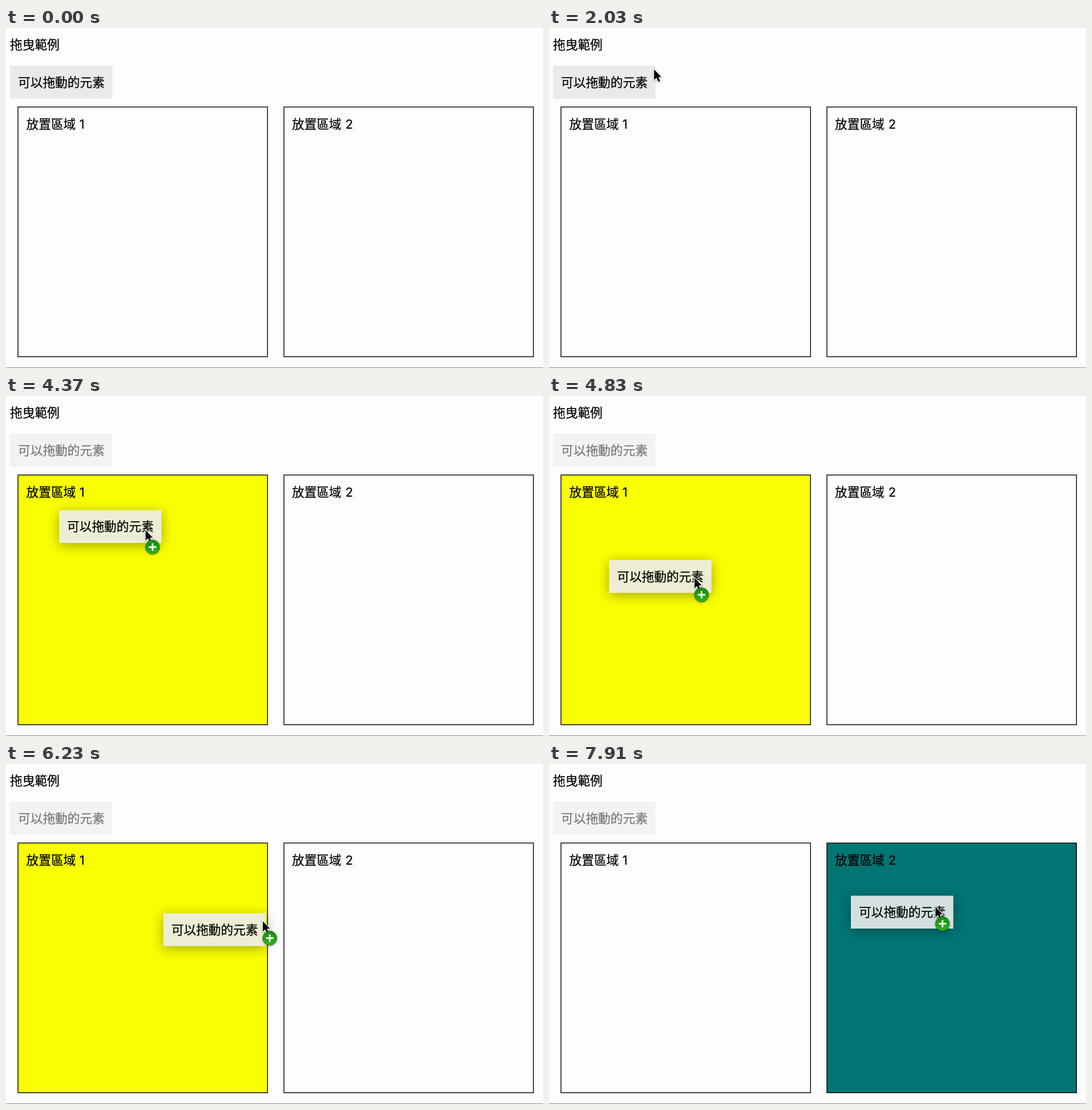
An HTML page that plays this animation: 941x595 px, repeating every 8000 ms.

```html
<!DOCTYPE html>
<html lang="zh-Hant">
<head>
<meta charset="utf-8">
<title>拖曳範例</title>
<style>
  html, body { margin: 0; width: 100%; height: 100%; overflow: hidden; background: #fdfdfc; }
  svg { display: block; width: 941px; height: 595px; }
  text { font: 21.7px Inter, "Noto Sans CJK TC", "Noto Sans CJK", sans-serif; fill: #000; stroke: #000; stroke-width: .25; }
  .zone { fill: #fdfdfd; stroke: #000; stroke-width: 1.4; }
  #ghost rect { fill: #ececec; opacity: .9; filter: drop-shadow(0 4px 10.5px rgba(0, 0, 0, .38)); }
  #cursor { filter: drop-shadow(0 1.5px 1.5px rgba(0, 0, 0, .35)); }
  #arrow, #cross { stroke: #fff; stroke-width: 2.2; stroke-linejoin: round; paint-order: stroke; }
</style>
</head>
<body>
<svg viewBox="0 0 941 595">
  <defs>
    <linearGradient id="green" x2="0" y2="1">
      <stop offset="0" stop-color="#168c10"/>
      <stop offset="1" stop-color="#32b41c"/>
    </linearGradient>
  </defs>
  <rect y="594" width="941" height="1" fill="#929284"/>
  <text x="7" y="36.8">拖曳範例</text>
  <g id="item">
    <rect x="7" y="66" width="179.5" height="58" fill="#eaeaea"/>
    <text x="21" y="102.9">可以拖動的元素</text>
  </g>
  <rect class="zone" x="21" y="138.3" width="437.3" height="437"/>
  <rect class="zone" x="487" y="138.3" width="437.3" height="437"/>
  <text x="35.5" y="175.6">放置區域<tspan dx="6.5">1</tspan></text>
  <text x="501" y="175.6">放置區域<tspan dx="7">2</tspan></text>
  <g id="ghost">
    <rect width="179.5" height="57.5"/>
    <text x="14" y="36.5">可以拖動的元素</text>
  </g>
  <g id="cursor">
    <path id="arrow" d="M.3 .5V18.6L4.5 14.8L7.6 22L10.8 20.7L7.8 13.6H13Z"/>
    <path id="cross" d="M0-9.5L4-5H1.2V-1.2H5V-4L9.5 0L5 4V1.2H1.2V5H4L0 9.5L-4 5H-1.2V1.2H-5V4L-9.5 0L-5-4V-1.2H-1.2V-5H-4Z"/>
    <g id="badge" transform="translate(12.5 30)">
      <circle r="12.4" fill="url(#green)" stroke="#12800c" stroke-width=".8"/>
      <path d="M-6.5 0H6.5M0-6.5V6.5" stroke="#fff" stroke-width="2.8"/>
    </g>
  </g>
</svg>
<script>
const LOOP = 8000, SHOW = 910, GRAB = 3890;
// The dragged box trails the pointer
const LAG = 80, GRIP = { x: 148, y: 19 };

const key = (t, x, y) => ({ t, x, y });
const pointerPath = [
  key(910, 884, 89), key(1290, 408, -4), key(1710, 408, -4),
  key(2030, 184, 72), key(2450, 157, 97), key(2830, 155, 88.5)
];
const boxPath = [
  key(GRAB, 7, 66), key(4370, 93, 199.5), key(5200, 115, 320),
  key(5670, 163.5, 294.5), key(6280, 290, 258), key(6610, 466, 233.5), key(7910, 529, 230.5)
];

const [itemEl, ghost, cursor, arrow, cross, badge] =
  ['item', 'ghost', 'cursor', 'arrow', 'cross', 'badge'].map(id => document.getElementById(id));
const zones = [...document.querySelectorAll('.zone')];
const lit = ['#f9fe00', '#007574'];

const slope = (a, b, c) => (b[c] - a[c]) / (b.t - a.t);

// Tangent that never overshoots a key
function tangent(path, i, c) {
  if (i === 0 || i === path.length - 1) return 0;
  const a = slope(path[i - 1], path[i], c), b = slope(path[i], path[i + 1], c);
  return a * b > 0 ? 2 * a * b / (a + b) : 0;
}

function sample(path, t) {
  const next = path.findIndex(k => k.t > t);
  if (next < 0) return path[path.length - 1];
  if (next === 0) return path[0];
  const i = next - 1, h = path[next].t - path[i].t;
  const u = (t - path[i].t) / h, v = 1 - u;
  const at = c => v * v * (1 + 2 * u) * path[i][c] + u * u * (3 - 2 * u) * path[next][c]
    + h * u * v * (v * tangent(path, i, c) - u * tangent(path, next, c));
  return { x: at('x'), y: at('y') };
}

const show = (el, on) => { el.style.display = on ? '' : 'none'; };
const move = (el, p) => el.setAttribute('transform', `translate(${p.x.toFixed(2)} ${p.y.toFixed(2)})`);

function dragPointer(t) {
  const ahead = sample(boxPath, t + LAG);
  return { x: ahead.x + GRIP.x, y: ahead.y + GRIP.y };
}

function zoneAt({ x, y }) {
  if (y < 138) return -1;
  return x < 459 ? 0 : x > 486 ? 1 : -1;
}

function render(t) {
  const dragging = t >= GRAB;
  const p = dragging ? dragPointer(t) : sample(pointerPath, t);
  const hover = !dragging && p.x < 180;
  const over = dragging ? zoneAt(p) : -1;
  move(cursor, p);
  move(ghost, sample(boxPath, t));
  show(cursor, t >= SHOW);
  show(arrow, !hover);
  show(cross, hover);
  show(badge, over >= 0);
  show(ghost, dragging);
  itemEl.style.opacity = dragging ? .52 : 1;
  zones.forEach((z, i) => { z.style.fill = i === over ? lit[i] : ''; });
}

const start = performance.now();
function tick() {
  render((performance.now() - start) % LOOP);
  requestAnimationFrame(tick);
}
tick();
</script>
</body>
</html>
```
